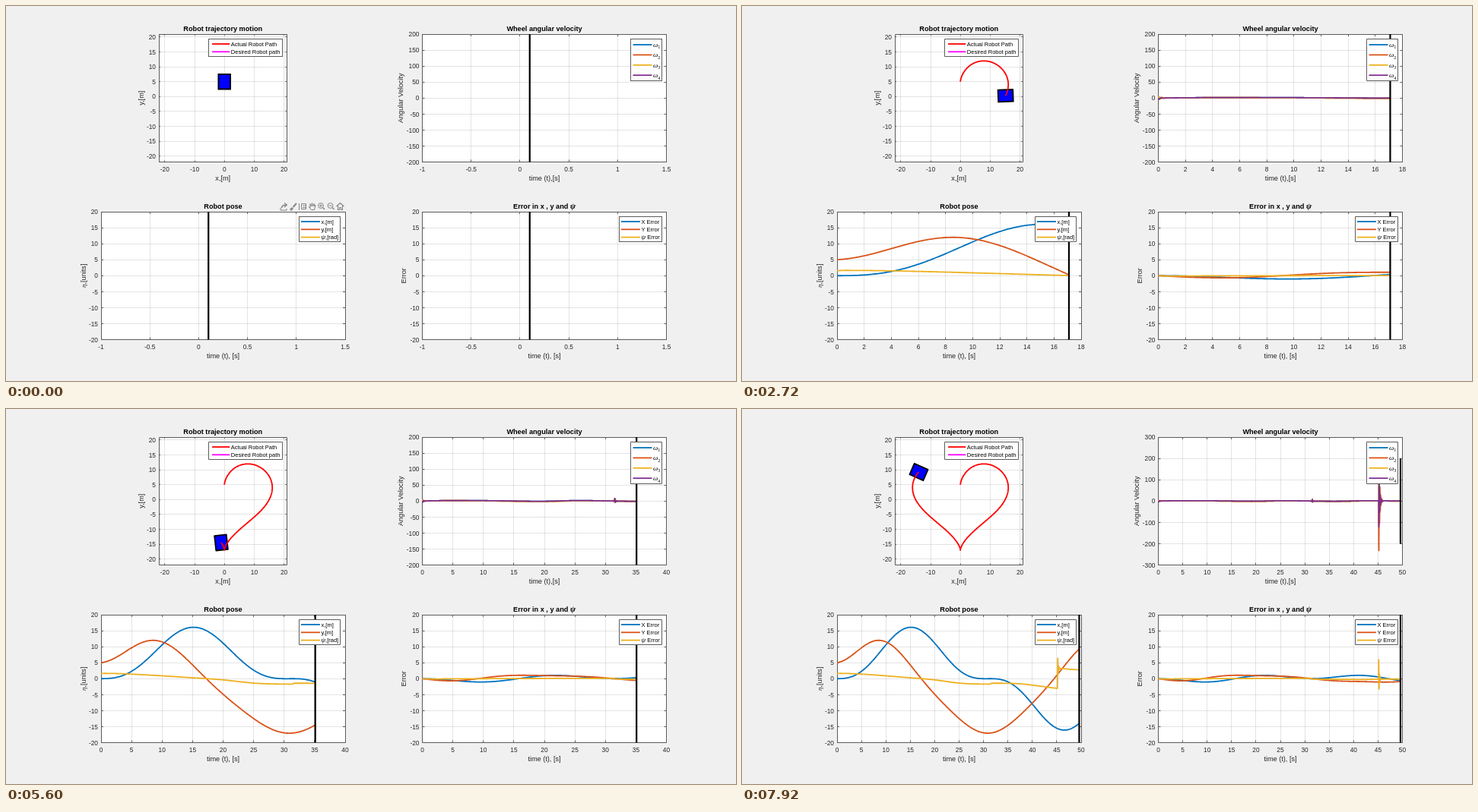
An HTML page with a canvas for the animation above (8 s loop, 960 by 494 pixels).

```html
<!DOCTYPE html>
<html lang="en">
<head>
<meta charset="utf-8">
<title>Robot trajectory plots</title>
<style>
html, body { margin: 0; width: 100%; height: 100%; overflow: hidden; background: #f0f0f0; }
canvas { display: block; }
</style>
</head>
<body>
<canvas id="stage" width="960" height="494"></canvas>
<script>
const ctx = document.getElementById('stage').getContext('2d');
const { sin, cos, exp, atan2, PI } = Math;

const SANS = '"Liberation Sans", Arial, sans-serif';
const SERIF = '"Liberation Serif", "Times New Roman", serif';
const FONT = {
  tick: `8.33px ${SANS}`,
  label: `9.17px ${SANS}`,
  title: `bold 9.17px ${SANS}`,
  key: `7.5px ${SANS}`,
  math: `italic 9px ${SERIF}`,
  mathBig: `italic bold 10.5px ${SERIF}`,
  sub: `6px ${SERIF}`
};
const INK = '#262626';
const FRAME = '#5c5c5c';
const GRID = 'rgba(38,38,38,0.12)';
const COLORS = ['#0072bd', '#d95319', '#edb120', '#7e2f8e'];

// ---- Model: heart curve tracked by a robot ----
const LEAD = 0.56;
const FLIP = 45.14;
const JOLT = 31.5;

function heart(t) {
  const a = t / 10;
  return [16 * sin(a) ** 3, 13 * cos(a) - 5 * cos(2 * a) - 2 * cos(3 * a) - cos(4 * a)];
}
function speed(t) {
  const a = t / 10;
  return [
    4.8 * sin(a) ** 2 * cos(a),
    -1.3 * sin(a) + sin(2 * a) + 0.6 * sin(3 * a) + 0.4 * sin(4 * a)
  ];
}
const position = t => {
  const p = heart(t), v = speed(t);
  return [p[0] + LEAD * v[0], p[1] + LEAD * v[1]];
};

const DRIFT = [[0, 0], [0.6, 0.09], [10, 0], [20, -0.07], [31.4, -0.12],
               [31.6, 0.15], [35, 0.16], [42, 0.27], [45, 0.13], [50, 0.11]];
function drift(t) {
  const i = Math.max(1, DRIFT.findIndex(p => p[0] >= t));
  const [t0, a] = DRIFT[i - 1], [t1, b] = DRIFT[i];
  return a + (b - a) * (t - t0) / (t1 - t0);
}
function bearing(t) {
  const [x, y] = heart(t);
  const a = atan2(y, x);
  return t > 31 && t < FLIP && a > 0 ? a - 2 * PI : a;
}
function headingError(t) {
  const s = t - FLIP;
  const ring = s < 0 ? 0 : 6.1 * exp(-s / 0.12) * cos(2 * PI * 6 * s);
  return ring - drift(t);
}
const heading = t => bearing(t) - headingError(t);

const pulse = (s, amp, tau, freq) => s < 0 ? 0 : amp * exp(-s / tau) * sin(2 * PI * freq * s);
const KICK = [130, -300, 110, -158];
function wheel(k, t) {
  const v = speed(t), h = bearing(t);
  const along = v[0] * cos(h) + v[1] * sin(h);
  const side = v[1] * cos(h) - v[0] * sin(h);
  const sign = k % 3 ? 1 : -1;
  return 1.1 * along + sign * 0.2 * side
    + pulse(t, sign * 5, 0.2, 3)
    + pulse(t - JOLT, 11, 0.12, 6)
    + pulse(t - FLIP, KICK[k], 0.17, 7);
}

// Finer steps where the signals ring
function sampleTimes(end) {
  const times = [];
  const busy = t => [0, JOLT, FLIP].some(s => t > s - 0.1 && t < s + 0.9);
  for (let t = 0; t < end; t += busy(t) ? 0.02 : 0.1) times.push(t);
  times.push(end);
  return times;
}

// ---- Drawing helpers ----
function text(str, font, x, y, align = 'center', color = INK) {
  ctx.font = FONT[font];
  ctx.textAlign = align;
  ctx.textBaseline = 'alphabetic';
  ctx.fillStyle = color;
  ctx.fillText(str, x, y);
}
// parts: [string, font, drop]
function rich(parts, x, y, centered, color) {
  const widths = parts.map(([s, f]) => { ctx.font = FONT[f]; return ctx.measureText(s).width; });
  if (centered) x -= widths.reduce((a, b) => a + b) / 2;
  parts.forEach(([s, f, drop = 0], i) => {
    text(s, f, x, y + drop, 'left', color);
    x += widths[i];
  });
}
function line(x0, y0, x1, y1, color, width = 1) {
  ctx.strokeStyle = color;
  ctx.lineWidth = width;
  ctx.beginPath();
  ctx.moveTo(x0, y0);
  ctx.lineTo(x1, y1);
  ctx.stroke();
}
function curve(points, color, width = 1.8) {
  ctx.strokeStyle = color;
  ctx.lineWidth = width;
  ctx.lineJoin = 'round';
  ctx.beginPath();
  points.forEach(p => ctx.lineTo(p[0], p[1]));
  ctx.stroke();
}
const crisp = v => Math.floor(v) + 0.5;

function box(x, y, w, h) {
  const l = crisp(x), t = crisp(y);
  ctx.strokeStyle = FRAME;
  ctx.lineWidth = 1;
  ctx.strokeRect(l, t, crisp(x + w) - l, crisp(y + h) - t);
}

function range(lo, hi, step) {
  const out = [];
  for (let i = Math.ceil(lo / step - 1e-6); i * step <= hi + 1e-6; i++) out.push(+(i * step).toFixed(2));
  return out;
}

// ax: x, y, w, h, xlim, ylim, xstep, ystep, title, xlabel, ylabel, ylabelX
function axes(ax, paint) {
  const { x, y, w, h, xlim, ylim } = ax;
  const px = v => x + (v - xlim[0]) / (xlim[1] - xlim[0]) * w;
  const py = v => y + h - (v - ylim[0]) / (ylim[1] - ylim[0]) * h;
  const xt = range(...xlim, ax.xstep), yt = range(...ylim, ax.ystep);

  ctx.fillStyle = '#fff';
  ctx.fillRect(x, y, w, h);
  xt.forEach(v => line(crisp(px(v)), y, crisp(px(v)), y + h, GRID));
  yt.forEach(v => line(x, crisp(py(v)), x + w, crisp(py(v)), GRID));

  box(x, y, w, h);
  const tick = w > 200 ? 3 : 2;
  xt.forEach(v => {
    const c = crisp(px(v));
    line(c, y, c, y + tick, FRAME);
    line(c, y + h, c, y + h - tick, FRAME);
    text(String(v), 'tick', px(v), y + h + 12.2);
  });
  yt.forEach(v => {
    const c = crisp(py(v));
    line(x, c, x + tick, c, FRAME);
    line(x + w, c, x + w - tick, c, FRAME);
    text(String(v), 'tick', x - 4, py(v) + 3.2, 'right');
  });

  rich(ax.title, x + w / 2, y - 4, true, '#000');
  text(ax.xlabel, 'label', x + w / 2, y + h + 24.3);
  ctx.save();
  ctx.translate(ax.ylabelX, y + h / 2);
  ctx.rotate(-PI / 2);
  rich(ax.ylabel, 0, 3, true);
  ctx.restore();

  ctx.save();
  ctx.beginPath();
  ctx.rect(x - 0.5, y - 0.5, w + 1, h + 1);
  ctx.clip();
  paint(px, py);
  ctx.restore();
}

function legend(x, y, w, h, rows, colors, first, gap, lineX, textX) {
  ctx.fillStyle = '#fff';
  ctx.fillRect(x, y, w, h);
  box(x, y, w, h);
  rows.forEach((parts, i) => {
    const cy = first + i * gap;
    line(lineX, cy, textX - 1.5, cy, colors[i], 1.8);
    rich(parts, textX, cy + 2.8, false, '#000');
  });
}

function toolbar() {
  const g = '#858585', y = 264;
  const ring = x => {
    ctx.beginPath();
    ctx.arc(x, y - 1, 3.4, 0, 2 * PI);
    ctx.stroke();
    line(x + 2.5, y + 1.5, x + 5, y + 4, g, 1.4);
    line(x - 1.8, y - 1, x + 1.8, y - 1, g);
  };
  curve([[361, 266], [361, 269], [369, 269], [369, 267]], g, 1);
  curve([[362, 266], [364, 263], [368, 262]], g, 1.4);
  curve([[366, 259.5], [369.5, 262], [366, 265]], g, 1.2);
  line(382, 260, 377.5, 265, g, 2);
  line(377, 266, 374, 269, g, 3);
  ctx.strokeStyle = g;
  ctx.lineWidth = 1;
  ctx.strokeRect(388.5, 260.5, 6, 7);
  line(385.5, 260, 385.5, 269, g);
  line(390, 263, 394, 263, g);
  line(390, 265.5, 394, 265.5, g);
  curve([[398, 264], [400, 266], [400, 260.5], [401.5, 264], [402.5, 259.5], [403.5, 264],
         [405, 260.5], [405.5, 264], [407, 262], [405.5, 268.5], [401.5, 268.5], [398, 264]], g, 1);
  ring(414);
  line(414, 261.2, 414, 264.8, g);
  ring(426.5);
  curve([[434.5, 264], [439.5, 259.5], [444.5, 264]], g, 1.1);
  curve([[436.5, 263], [436.5, 268.5], [438.5, 268.5], [438.5, 265.5], [440.5, 265.5],
         [440.5, 268.5], [442.5, 268.5], [442.5, 263]], g, 1.1);
}

// ---- Scene ----
function timeAxis(t) {
  if (t < 0.2) return { xlim: [-1, 1.5], xstep: 0.5 };
  const xstep = [0.1, 0.2, 0.5, 1, 2, 5].find(s => t <= s * 10 + 1e-6);
  return { xlim: [0, Math.ceil(t / xstep - 1e-6) * xstep], xstep };
}

function draw(frame) {
  const t = 0.1 + frame * 0.5;
  const times = frame ? sampleTimes(t) : [];
  const time = timeAxis(t);
  const path = times.map(position);
  const cursor = (px, py, span) => line(px(t), py(-span), px(t), py(span), '#000', 2.2);
  const plot = (px, py, fn, color) =>
    curve(times.map((s, i) => [px(s), py(fn(s, i))]), color);

  ctx.fillStyle = '#f0f0f0';
  ctx.fillRect(0, 0, 960, 494);

  axes({
    x: 201, y: 37, w: 168.5, h: 168.5, xlim: [-22, 21], ylim: [-22, 21], xstep: 10, ystep: 5,
    title: [['Robot trajectory motion', 'title']], xlabel: 'x,[m]',
    ylabel: [['y,[m]', 'label']], ylabelX: 178
  }, (px, py) => {
    const [x, y] = position(frame ? t : 0);
    const unit = px(1) - px(0);
    ctx.save();
    ctx.translate(px(x), py(y));
    ctx.rotate(frame ? -heading(t) : -PI / 2);
    ctx.fillStyle = '#00f';
    ctx.strokeStyle = '#000';
    ctx.lineWidth = 1.8;
    ctx.beginPath();
    ctx.rect(-2.5 * unit, -2 * unit, 5 * unit, 4 * unit);
    ctx.fill();
    ctx.stroke();
    ctx.restore();
    curve(path.map(p => [px(p[0]), py(p[1])]), '#f00');
  });
  legend(266.5, 43.5, 96.5, 22.5,
    [[['Actual Robot Path', 'key']], [['Desired Robot path', 'key']]],
    ['#f00', '#f0f'], 50, 10.3, 271, 295.8);

  const high = t > FLIP;
  const top = high ? 300 : 200;
  axes({
    x: 547.5, y: 37, w: 321, h: 168.5, ...time, ylim: [-top, top], ystep: high ? 100 : 50,
    title: [['Wheel angular velocity', 'title']], xlabel: 'time (t),[s]',
    ylabel: [['Angular Velocity', 'label']], ylabelX: 519
  }, (px, py) => {
    COLORS.forEach((c, k) => plot(px, py, s => wheel(k, s), c));
    cursor(px, py, 200);
  });
  legend(821.5, 43.5, 41, 55,
    [1, 2, 3, 4].map(n => [['ω', 'math'], [String(n), 'sub', 2.5]]),
    COLORS, 51, 13.4, 824.5, 851);

  axes({
    x: 125, y: 271, w: 321, h: 168.5, ...time, ylim: [-20, 20], ystep: 5,
    title: [['Robot pose', 'title']], xlabel: 'time (t), [s]',
    ylabel: [['η', 'math'], [',[units]', 'label']], ylabelX: 102
  }, (px, py) => {
    plot(px, py, (s, i) => path[i][0], COLORS[0]);
    plot(px, py, (s, i) => path[i][1], COLORS[1]);
    plot(px, py, heading, COLORS[2]);
    cursor(px, py, 20);
  });
  legend(385.5, 277.5, 53.5, 33,
    [[['x,[m]', 'key']], [['y,[m]', 'key']], [['ψ', 'math'], [',[rad]', 'key']]],
    COLORS, 284, 10.3, 388, 414.5);

  axes({
    x: 547.5, y: 271, w: 321, h: 168.5, ...time, ylim: [-20, 20], ystep: 5,
    title: [['Error in x , y and ', 'title'], ['ψ', 'mathBig']], xlabel: 'time (t), [s]',
    ylabel: [['Error', 'label']], ylabelX: 523
  }, (px, py) => {
    plot(px, py, s => -LEAD * speed(s)[0], COLORS[0]);
    plot(px, py, s => -LEAD * speed(s)[1], COLORS[1]);
    plot(px, py, headingError, COLORS[2]);
    cursor(px, py, 20);
  });
  legend(806.5, 277.5, 56, 33,
    [[['X Error', 'key']], [['Y Error', 'key']], [['ψ', 'math'], [' Error', 'key']]],
    COLORS, 284, 10.3, 809, 835.5);

  if (!frame) toolbar();
}

let shown = -1;
const start = performance.now();
function loop() {
  const frame = Math.floor(((performance.now() - start) % 8000) / 80);
  if (frame !== shown) draw(shown = frame);
  requestAnimationFrame(loop);
}
loop();
</script>
</body>
</html>
```
